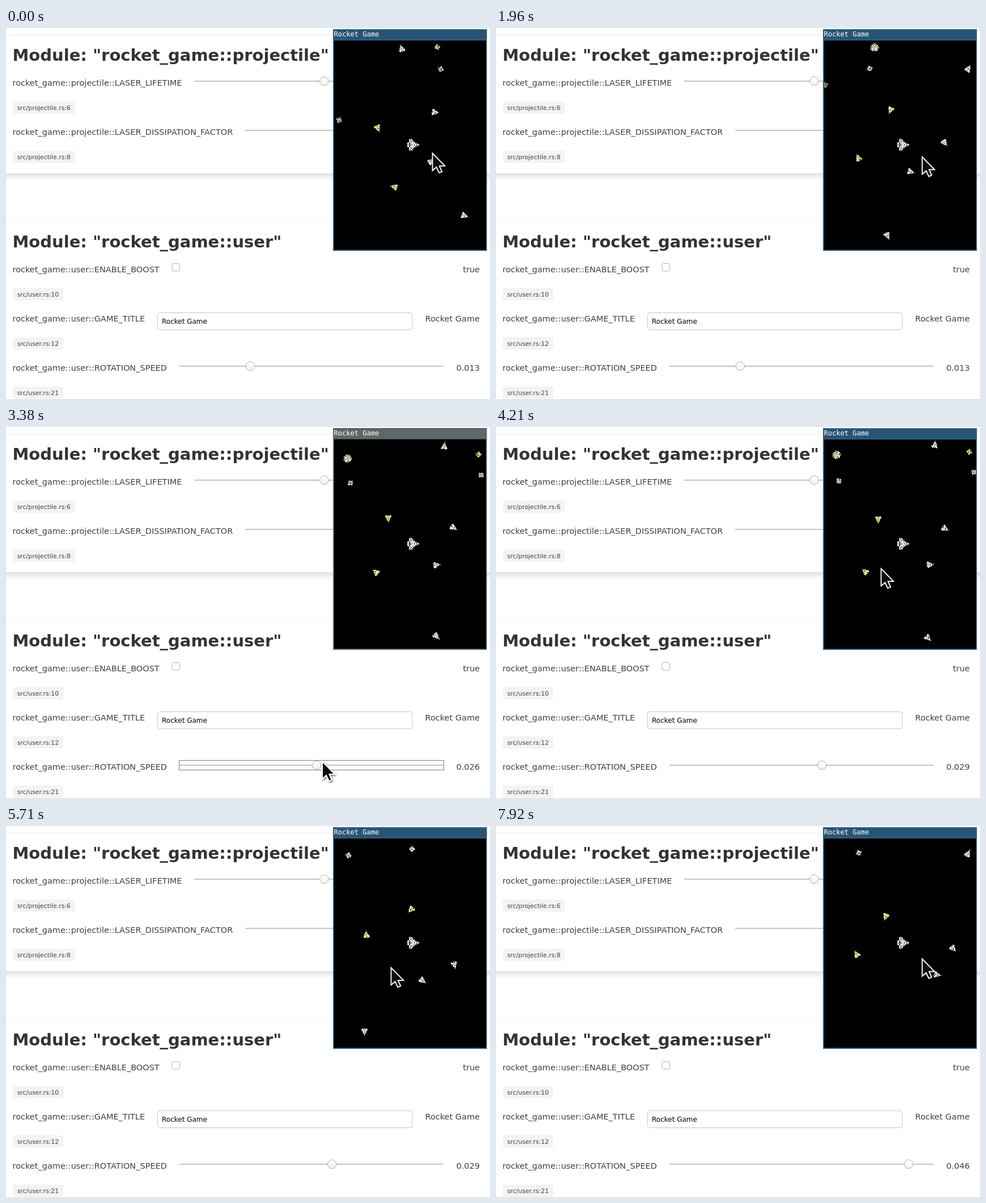
These frames come from a looping animation (854 px wide and 656 px high, 8000 ms). An HTML page:

```html
<!DOCTYPE html>
<html lang="en">
<head>
<meta charset="utf-8">
<title>Rocket Game</title>
<style>
  html, body { margin: 0; width: 100%; height: 100%; overflow: hidden; background: #fff; }
  svg { display: block; }
  text { font-family: "DejaVu Sans", Verdana, sans-serif; font-size: 14.5px; fill: #404040; white-space: pre; }
  .head { font-size: 29px; font-weight: bold; fill: #333; }
  .path { font-size: 10.9px; }
  .field { font-size: 12px; fill: #000; }
  .title { font: 12.07px "DejaVu Sans Mono", monospace; fill: #fff; }
  .value { text-anchor: end; }
</style>
</head>
<body>
<svg id="stage" width="854" height="656" viewBox="0 0 854 656">
  <defs>
    <filter id="soft" x="-10%" y="-10%" width="120%" height="125%">
      <feDropShadow dx="0" dy="5" stdDeviation="6" flood-opacity=".15"/>
    </filter>
    <filter id="lift" x="-30%" y="-30%" width="180%" height="180%">
      <feDropShadow dx="1.5" dy="2.5" stdDeviation="1.4" flood-opacity=".5"/>
    </filter>
    <linearGradient id="knob" x2="0" y2="1">
      <stop stop-color="#fff"/><stop offset="1" stop-color="#f1f0ee"/>
    </linearGradient>
    <clipPath id="space"><rect x="579" y="24" width="268" height="364"/></clipPath>
  </defs>
  <rect x="-20" y="13" width="894" height="243.5" fill="#fff" filter="url(#soft)"/>
  <path d="M0 13.5H854M0 343.5H854" stroke="#f5f5f5"/>
  <g id="page"></g>
  <rect id="focus" x="305.5" y="589.5" width="467" height="17" fill="none" stroke="#000" stroke-dasharray="1 1"/>
  <rect id="frame" x="577" y="2" width="271.5" height="392"/>
  <path id="edge" d="M577 2.5H848.5M577 21.5H848.5"/>
  <rect x="579" y="22" width="268" height="370"/>
  <text class="title" x="578.5" y="15">Rocket Game</text>
  <g id="sky" clip-path="url(#space)" shape-rendering="crispEdges"></g>
  <path id="cursor" d="M0 0V30.5L7 24.5L11.7 34.6L16.7 32.3L12.2 22.4H21.8Z"
        fill="#111" stroke="#fff" stroke-width="1.8" filter="url(#lift)"/>
</svg>
<script>
const LOOP = 8000, CX = 718, CY = 206.5;
const $ = id => document.getElementById(id);

function add(parent, tag, attrs, text) {
  const el = document.createElementNS("http://www.w3.org/2000/svg", tag);
  for (const k in attrs) el.setAttribute(k, attrs[k]);
  if (text !== undefined) el.textContent = text;
  parent.appendChild(el);
  return el;
}

// ---- settings page ----
const page = $("page");
const label = (x, y, text, cls = "") => add(page, "text", { x, y, class: cls }, text);
const box = (x, y, width, height, rx, fill, stroke = "none") =>
  add(page, "rect", { x, y, width, height, rx, fill, stroke });

function row(y, name, file) {
  label(11.5, y, "rocket_game::" + name);
  const text = label(19.7, y + 43, file, "path");
  const badge = box(12, y + 28, text.getComputedTextLength() + 15.5, 21.5, 3.5, "#f3f3f3");
  page.insertBefore(badge, text);
}

function slider(y, from, knobX) {
  add(page, "path", { d: `M${from} ${y}H772`, stroke: "#c6c4c1", "stroke-width": 2 });
  return add(page, "circle", { cx: knobX, cy: y, r: 7.7, fill: "url(#knob)", stroke: "#b3b0ac" });
}

function draftPage() {
  label(11.5, 58, 'Module: "rocket_game::projectile"', "head");
  row(102, "projectile::LASER_LIFETIME", "src/projectile.rs:6");
  row(189, "projectile::LASER_DISSIPATION_FACTOR", "src/projectile.rs:8");
  label(11.5, 388, 'Module: "rocket_game::user"', "head");
  row(432, "user::ENABLE_BOOST", "src/user.rs:10");
  row(519, "user::GAME_TITLE", "src/user.rs:12");
  row(606, "user::ROTATION_SPEED", "src/user.rs:21");
  slider(94, 332, 561.5);
  slider(181, 422, 700);
  box(293, 416.5, 13.5, 13.5, 2.5, "#fff", "#b6b2ac");
  box(267.5, 503.5, 449.5, 30, 4, "#fff", "#c6c6c6");
  label(275, 523, "Rocket Game", "field");
  label(836, 432, "true", "value");
  label(836, 519, "Rocket Game", "value");
}
draftPage();
const knob = slider(598, 306, 431);
const speed = label(836, 606, "", "value");

// ---- speckled sprites, mirrored about their heading ----
const noise = (x, y) => {
  const n = Math.sin(x * 12.9898 + Math.abs(y) * 78.233) * 43758.5453;
  return n - Math.floor(n);
};

function speckle(from, to, half) {
  let d = "";
  for (let x = from; x <= to; x++)
    for (let y = -12; y <= 12; y++)
      if (Math.abs(y) <= half(x) && noise(x, y) < .7) d += `M${x - .5} ${y - .5}h1v1h-1z`;
  return d;
}

const ring = r => `M${r} 0L0 ${r}L${-r} 0L0 ${-r}Z`;
const shapes = {
  ship: speckle(-11, 10, x => x < -8 ? 14 + x : x < -3 ? 10 : x < 3 ? 6.7 - x * 1.1 : (10.5 - x) / 2),
  dart: speckle(-5, 7, x => (7.5 - x) / 2),
  gem: ring(5) + ring(4) + ring(2.5) + ring(1.5),
  bulk: speckle(-7, 7, x => Math.sqrt(50 - x * x))
};

// ---- motion ----
const clamp = (v, lo, hi) => Math.min(hi, Math.max(lo, v));
const within = (t, a, b) => t >= a && t < b;

// Each move glides from wherever the last one ended: [start, end, ...target].
function glide(moves, t) {
  let now = moves[0].slice(2);
  for (const [from, to, ...goal] of moves) {
    if (t < from) break;
    const u = to > from ? Math.min(1, (t - from) / (to - from)) : 1;
    now = now.map((v, i) => v + (goal[i] - v) * u);
  }
  return now;
}

const pointer = [
  [0, 0, 752.5, 221.5], [1420, 1420, 752, 228], [2250, 2670, 525, 499.5], [2670, 2900, 441, 591.5],
  [3080, 3450, 585, 591.5], [3450, 3860, 679.5, 250.5], [5750, 6350, 585, 591.5],
  [6740, 7280, 738, 591.5], [7460, 7900, 752, 235]
];
const steps = [[0, 0, 13], [3080, 3450, 29], [6740, 7280, 46]];

// Turn key presses: start, end, direction, radians per tick at 60 ticks a second.
const presses = [
  [430, 1000, 1, .013], [1420, 1939, 1, .013], [1939, 2466, -1, .013],
  [4210, 5185, 1, .029], [5185, 5970, -1, .029]
];
const heading = t => presses.reduce(
  (sum, [from, to, dir, rate]) => sum + dir * rate * .06 * clamp(t - from, 0, to - from), 0);

// Every enemy drifts straight ahead: position around the ship, then pixels per second.
const CREAM = "#ecebcf", YELLOW = "#ece88e";
const enemies = [
  ["dart", CREAM, -20, -170, -.9, -2.9],
  ["gem", YELLOW, 43, -172.5, -1.5, -5.8],
  ["gem", CREAM, 49, -133.5, 2.5, -8.2],
  ["dart", CREAM, 39, -57.5, 4, .4],
  ["gem", CREAM, -130, -43.5, -4.6, -2.1],
  ["dart", YELLOW, -62, -29.5, 1, 2.2],
  ["dart", CREAM, 32, 29.5, 6.4, -3.9],
  ["dart", YELLOW, -33, 74.5, -1.5, -.4],
  ["dart", CREAM, 91, 125.5, 4.7, 1.5],
  ["bulk", CREAM, -150, -67, -5.4, -6],
  ["gem", CREAM, -163, 18, -3.7, 6.2]
].map(([shape, color, x, y, vx, vy]) => {
  const paint = shape === "gem" ? { fill: "none", stroke: color, "stroke-dasharray": "2 1" } : { fill: color };
  return { x, y, vx, vy, el: add($("sky"), "path", { d: shapes[shape], ...paint }) };
});
add($("sky"), "path", { d: shapes.ship, fill: "#fff", transform: "translate(719.5 206.5)" });

function drawGame(t) {
  const turn = heading(t), c = Math.cos(turn), s = Math.sin(turn);
  for (const { x, y, vx, vy, el } of enemies) {
    const wx = x + vx * t / 1000, wy = y + vy * t / 1000;
    const angle = (Math.atan2(vy, vx) + turn) * 180 / Math.PI;
    el.setAttribute("transform",
      `translate(${CX + wx * c - wy * s} ${CY + wx * s + wy * c}) rotate(${angle})`);
  }
}

function draw(t) {
  const [px, py] = glide(pointer, t);
  $("cursor").setAttribute("transform", `translate(${px} ${py})`);

  const step = Math.round(glide(steps, t)[0]);
  knob.setAttribute("cx", 314 + step * 9);
  speed.textContent = (step / 1000).toFixed(3);
  $("focus").style.display = within(t, 2960, 3800) || within(t, 6400, 7750) ? "" : "none";

  const away = within(t, 2466, 3800) || within(t, 5970, 7750);
  $("frame").setAttribute("fill", away ? "#5f676a" : "#285577");
  $("edge").setAttribute("stroke", away ? "#3c4042" : "#3d6a8c");

  // The game stands still during two short pauses.
  drawGame(within(t, 1000, 1420) ? 1000 : within(t, 3920, 4080) ? 3920 : t);
}

const start = performance.now();
function tick() {
  draw((performance.now() - start) % LOOP);
  requestAnimationFrame(tick);
}
tick();
</script>
</body>
</html>
```
